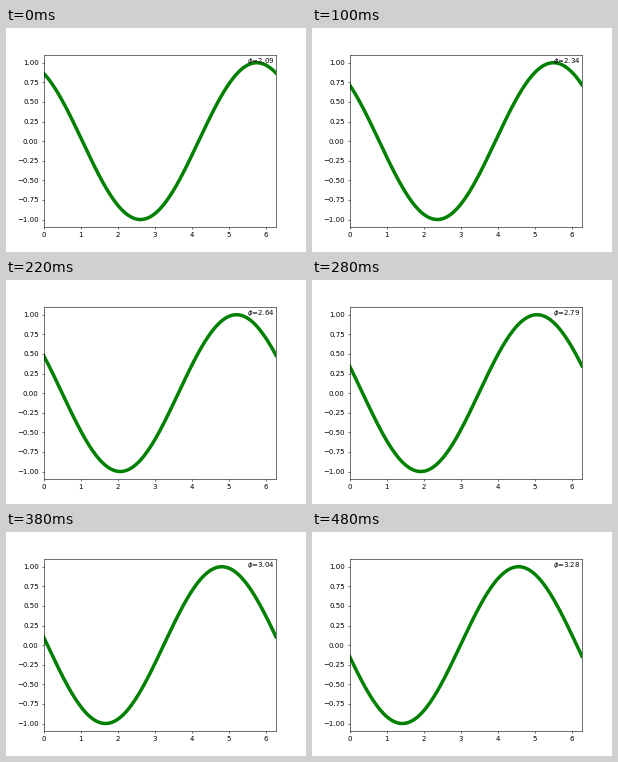
Write a matplotlib script that moves like this. It is 300x224 px and loops after 0.5 s.

```python
import numpy as np
import matplotlib.pyplot as plt
from matplotlib.animation import FuncAnimation

FRAMES = 25
INTERVAL = 20  # ms
PHASE_START = 2.0915
PHASE_STEP = 0.0497

fig, ax = plt.subplots(figsize=(6, 4.48), dpi=50)
ax.set_xlim(0, 2 * np.pi)
ax.set_ylim(-1.1, 1.1)

x = np.linspace(0, 2 * np.pi, 200)
wave, = ax.plot(x, np.sin(x + PHASE_START), color="green", lw=5)
label = ax.text(5.5, 1, "")


def update(i):
    phase = PHASE_START + PHASE_STEP * i
    wave.set_ydata(np.sin(x + phase))
    label.set_text(rf"$\phi$={phase:.2f}")
    return wave, label


anim = FuncAnimation(fig, update, frames=FRAMES, interval=INTERVAL,
                     repeat=True, repeat_delay=0)
plt.show()
```
